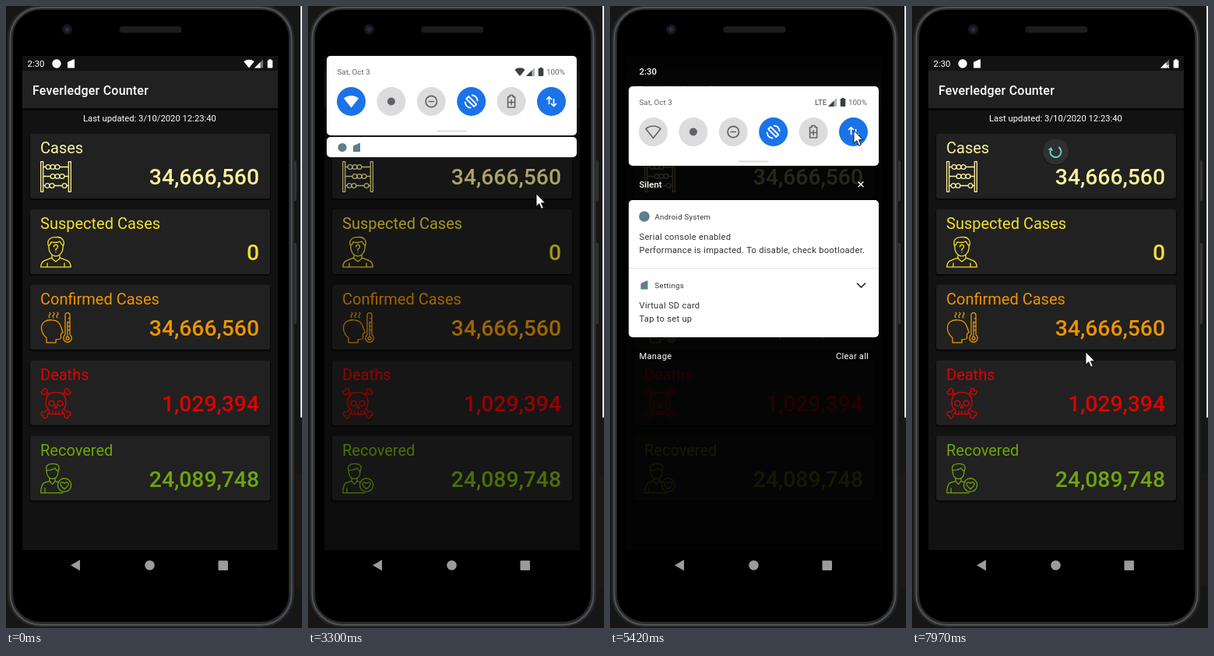
Recreate the animation shown at these times as an HTML page with a canvas. Size 380x798 px, loop 8000 ms.

```html
<!DOCTYPE html>
<html lang="en">
<head>
<meta charset="utf-8">
<title>Case counter</title>
<style>
html, body { margin: 0; width: 100%; height: 100%; overflow: hidden; background: #141414; }
canvas { display: block; width: 380px; height: 798px; }
</style>
</head>
<body>
<canvas id="stage"></canvas>
<script>
const W = 380, H = 798, LOOP = 8000;
const stage = document.getElementById('stage');
const dpr = window.devicePixelRatio || 1;
stage.width = W * dpr;
stage.height = H * dpr;
const c = stage.getContext('2d');

// Screen updates come in bursts: [start, end, steps]
const bursts = [
  [0, 0, 1], [350, 590, 3], [830, 1530, 7], [1650, 2370, 7], [2490, 2490, 1],
  [2950, 3660, 7], [3760, 4210, 5], [4440, 4440, 1], [4690, 5420, 7],
  [5750, 6180, 5], [6400, 7140, 7], [7250, 7250, 1], [7500, 7970, 5]
];

const pointer = [
  [350, 121, 118], [470, 165, 140], [590, 198, 160], [830, 200, 215], [950, 208, 363],
  [1070, 212, 362], [1190, 240, 310], [1310, 270, 240], [1530, 294, 172],
  [1650, 303, 140], [1890, 326, 75], [2130, 312, 61], [2370, 300, 64], [2490, 298, 69],
  [2950, 298, 73], [3070, 297, 100], [3300, 293, 241], [3540, 291, 405], [3660, 290, 455],
  [3760, 290, 462], [3880, 290, 462], [4210, 67, 180], [4440, 57, 157], [4690, 57, 158],
  [4810, 70, 167], [5050, 190, 172], [5290, 304, 164], [5420, 313, 160], [5750, 313, 160],
  [5850, 300, 230], [6070, 191, 490], [6180, 211, 513], [6640, 211, 513],
  [7140, 217, 249], [7250, 217, 249], [7500, 218, 290], [7740, 225, 400], [7970, 223, 444]
];
// 0 closed, 1 header only, 2 fully open
const shadeKeys = [
  [2950, 0], [3070, .25], [3190, .6], [3300, 1], [3420, 1.45], [3540, 1.85], [3660, 2],
  [6280, 2], [6400, 1.7], [6520, .8], [6640, .19], [6760, .08], [6880, .02], [7000, 0]
];
const spinY = [
  [830, 122], [950, 165], [1070, 187], [1650, 187], [7400, 118],
  [7500, 124], [7620, 146], [7740, 167], [7850, 180], [7970, 187]
];
const spinSize = [[820, 0], [830, 1], [1430, 1], [1530, .5], [1640, 0], [7490, 0], [7500, 1]];

const clamp = v => Math.max(0, Math.min(1, v));
const mix = (a, b, k) => a + (b - a) * k;

function key(list, t, i = 1) {
  if (t <= list[0][0]) return list[0][i];
  for (let n = 1; n < list.length; n++) {
    const a = list[n - 1], b = list[n];
    if (t <= b[0]) return mix(a[i], b[i], (t - a[0]) / (b[0] - a[0]));
  }
  return list[list.length - 1][i];
}

function hold(t) {
  let last = 0;
  for (const [a, b, n] of bursts) {
    for (let i = 0; i < n; i++) {
      const at = n > 1 ? Math.floor((a + (b - a) * i / (n - 1)) / 10) * 10 : a;
      if (at > t) return last;
      last = at;
    }
  }
  return last;
}

function box(x, y, w, h, r, fill) {
  c.beginPath();
  c.roundRect(x, y, w, h, r);
  c.fillStyle = fill;
  c.fill();
}

function disc(x, y, r, fill) {
  c.beginPath();
  c.arc(x, y, r, 0, 7);
  c.fillStyle = fill;
  c.fill();
}

function text(s, x, y, size, fill, { weight = 400, align = 'left', gap = 0 } = {}) {
  c.font = `${weight} ${size}px Roboto, sans-serif`;
  c.letterSpacing = gap + 'px';
  c.textAlign = align;
  c.fillStyle = fill;
  c.fillText(s, x, y);
}

function shape(d, x, y, { fill, stroke, width = 1.3 } = {}) {
  const p = new Path2D(d);
  c.save();
  c.translate(x, y);
  c.lineWidth = width;
  c.lineJoin = c.lineCap = 'round';
  if (fill) { c.fillStyle = fill; c.fill(p); }
  if (stroke) { c.strokeStyle = stroke; c.stroke(p); }
  c.restore();
}

function faded(a, draw) {
  if (a <= 0) return;
  c.save();
  c.globalAlpha *= clamp(a);
  draw();
  c.restore();
}

const ring = (x, y, r) => `M${x - r} ${y}a${r} ${r} 0 1 0 ${2 * r} 0a${r} ${r} 0 1 0 ${-2 * r} 0`;
const beads = (y, xs) => xs.map(x => ring(x, y, 2.9)).join('');

const icons = {
  abacus: 'M.7 .7h3v38.6h-3zM36.3 .7h3v38.6h-3zM3.7 7.5H7M25 7.5H36.3M3.7 19.5H13M31 19.5H36.3M3.7 31.5H6M18.5 31.5H28M34 31.5H36.3'
    + beads(7.5, [10, 16, 22]) + beads(19.5, [16, 22, 28]) + beads(31.5, [9, 15, 31]),
  suspect: 'M11 13C7 4 14 0 20 .8C27-.5 33 5 29 13M11 11C10 18 14 25 20 25S30 18 29 11C26 10 26 6 25 6C21 9 15 7 14 7C13 9 13 11 11 11M15 24V28L20 32L25 28V24M15 27L5 31Q1 33 .8 39H39.2Q39 33 35 31L25 27M9 39V34M31 39V34'
    + 'M17.5 13Q17.5 10.5 20 10.5T22.5 13Q22.5 14.5 20 16V17.5M20 20v.2',
  fever: 'M8 39V33Q2 28 1.5 21C1 12 9 9.5 15 10Q25 10.5 27 20L29 26L26.5 28V33Q26 35 20 35V39Z'
    + 'M12 7q-2-2 0-3.5t0-3M17 7q-2-2 0-3.5t0-3M22 7q-2-2 0-3.5t0-3'
    + 'M32 29V4Q32 .8 35 .8T38 4V29A5.2 5.2 0 1 1 32 29M35 12V31M38 8h-2M38 13h-2M38 18h-2M38 23h-2' + ring(35, 33.5, 2),
  skull: 'M12 29Q7 26 7 18Q8 6 20 6T33 18Q33 26 28 29V34H12ZM16 30v4M20 30v4M24 30v4M20 22l-2 4h4z'
    + ring(14.5, 20, 3.4) + ring(25.5, 20, 3.4)
    + 'M10 10L7 8Q2 10 1 6Q1 4 4 4Q4 0 7 1Q10 3 8 6L12 8M30 10L33 8Q38 10 39 6Q39 4 36 4Q36 0 33 1Q30 3 32 6L28 8'
    + 'M9 28L6 31Q1 30 1 34Q1 36 4 36Q4 40 7 39Q10 37 9 34L12 31M31 28L34 31Q39 30 39 34Q39 36 36 36Q36 40 33 39Q30 37 31 34L28 31',
  healed: 'M8 9C6 2 12 .5 16 .8C22 0 26 4 23 10C23 17 20 20 15.5 20S8 16 8 9C13 9 17 8 19 6Q20 9 23 10M12 19V23L15.5 27L19 23V19M12 23L5 25Q.8 28 .8 38H29M6 38V32M19 23L24 24.5'
    + ring(31, 28, 8.6) + 'M31 33Q25.5 29 26 26Q28 22.5 31 26Q34 22.5 36 26Q36.5 29 31 33'
};

const cards = [
  ['Cases', '34,666,560', '#fff59d', 'abacus'],
  ['Suspected Cases', '0', '#f5e02c', 'suspect'],
  ['Confirmed Cases', '34,666,560', '#ee9500', 'fever'],
  ['Deaths', '1,029,394', '#e00000', 'skull'],
  ['Recovered', '24,089,748', '#6fa50a', 'healed']
];

const sdCard = 'M3-5.5H4.5V5.5H-4.5V-2Z';
const fan = 'M0 5.5L-6.7 -2.7A10.4 10.4 0 0 1 6.7 -2.7Z';

function phone() {
  c.fillStyle = '#161616';
  c.fillRect(0, 0, W, H);
  c.fillStyle = '#1d1813';
  c.fillRect(372, 600, 8, 145);
  c.fillStyle = '#e6e6e6';
  c.fillRect(378, 0, 2, 528);
  box(367, 198, 6, 52, 2, '#303234');
  box(367, 304, 6, 104, 2, '#303234');
  box(2, -1, 368, 798, 42, '#27292b');
  c.beginPath();
  c.roundRect(5.5, 2, 361, 792, 39);
  c.lineWidth = 2;
  c.strokeStyle = '#505356';
  c.stroke();
  box(9, 5, 354, 785, 35, '#000');
  disc(78.5, 30, 6.5, '#15171b');
  disc(78.5, 30, 3, '#262c40');
  box(145.5, 26, 80, 8.5, 4, '#1c1c1c');
  shape('M-6 0L6-7V7Z', 89, 717.5, { fill: '#9b9b9b' });
  disc(184.5, 717.5, 6.3, '#9b9b9b');
  box(272.5, 711.5, 12.5, 12.5, 1, '#9b9b9b');
}

function signal(x, y, col, offline) {
  faded(.4, () => shape('M-5.5 5.5H5.5V-5.5Z', x, y, { fill: col }));
  shape('M-5.5 5.5H2V-2Z', x, y, { fill: col });
  if (offline) shape('M2 2l3 3M5 2l-3 3', x, y, { stroke: col, width: 1.2 });
}

function battery(x, y, col) {
  box(x - 3.3, y - 4.5, 6.6, 10, 1, col);
  box(x - 1.5, y - 5.7, 3, 2, 0, col);
}

function statusBar(t) {
  text('2:30', 27.5, 78, 11.4, '#fff');
  disc(65, 74, 5.7, '#fff');
  shape(sdCard, 83.5, 74, { fill: '#fff' });
  if (t < 4800) shape(fan, 312, 74, { fill: '#fff' });
  signal(324.5, 74, '#fff', t >= 5750);
  battery(339, 74, '#fff');
}

function app() {
  c.fillStyle = '#121212';
  c.fillRect(21, 64, 328, 634);
  c.fillStyle = '#060606';
  c.fillRect(21, 131, 328, 3);
  c.fillStyle = '#212121';
  c.fillRect(21, 83, 328, 48);
  text('Feverledger Counter', 34, 113.5, 16, '#fff', { weight: 500, gap: .21 });
  text('Last updated: 3/10/2020 12:23:40', 184.5, 148, 11.27, '#fff', { align: 'center' });
  cards.forEach(([name, count, col, icon], i) => {
    const y = 164 + i * 96.9;
    box(30, y + .5, 310, 84.5, 4, '#070707');
    box(31, y, 308, 83, 3, '#212121');
    text(name, 44, y + 25, 20, col);
    text(count, 325, y + 65, 28.3, col, { weight: 500, align: 'right' });
    shape(icons[icon], 44, y + 35, { stroke: col });
  });
}

function spinner(t) {
  const size = key(spinSize, t);
  if (size <= 0) return;
  c.save();
  c.beginPath();
  c.rect(21, 131, 328, 567);
  c.clip();
  c.translate(184.5, key(spinY, t));
  c.scale(size, size);
  disc(0, 1, 17, 'rgba(0,0,0,.3)');
  disc(0, 0, 16.5, '#303030');
  c.rotate(t < 3000 ? (t - 1070) / 160 : (t - 7970) / 250);
  const end = 3.4;
  c.beginPath();
  c.arc(0, 0, 7, -1, end);
  c.lineWidth = 1.9;
  c.strokeStyle = '#5fd9c1';
  c.stroke();
  c.rotate(end);
  shape('M3.5 0H10.5L7 4Z', 0, 0, { fill: '#5fd9c1' });
  c.restore();
}

const BLUE = '#1a73e8', GREY = '#5f6368';
const tileIcons = [
  (x, y, col, on) => shape('M0 8L-9.5-4A14.5 14.5 0 0 1 9.5-4Z', x, y, on ? { fill: col } : { stroke: col, width: 1.6 }),
  (x, y, col) => disc(x, y, 5, col),
  (x, y, col) => shape(ring(0, 0, 7.2) + 'M-3 0H3', x, y, { stroke: col, width: 1.7 }),
  (x, y, col) => shape('M-3.5-6.5L6.5 3.5L3.5 6.5L-6.5-3.5ZM1-8Q7-7.5 8-1M-1 8Q-7 7.5-8 1', x, y, { stroke: col, width: 1.8 }),
  (x, y, col) => shape('M-4.5-6H-2V-8H2V-6H4.5V7.5H-4.5ZM0-2V4M-3 1H3', x, y, { stroke: col, width: 1.6 }),
  (x, y, col) => shape('M-3 3V-6M-6-3L-3-6L0-3M3-3V6M0 3L3 6L6 3', x, y, { stroke: col, width: 1.7 })
];

function ripple(x, y, age) {
  if (age < 0 || age > 420) return;
  faded(.22 * (1 - age / 450), () => disc(x, y, mix(17, 24, clamp(age / 150)), '#555'));
}

// Laid out at its open position; the caller shifts it
function header(t, s) {
  box(24, 103, 321, 102, 5, '#fff');
  faded((s - .3) * 2, () => {
    text('Sat, Oct 3', 37.5, 127, 9.8, GREY, { gap: .05 });
    if (t < 4800) shape(fan, 272, 123.5, { fill: '#3c4043' });
    else if (t < 5850) text('LTE', 263, 127, 9.8, '#3c4043');
    signal(285.5, 123.5, '#3c4043', t >= 5850);
    battery(299, 123.5, '#3c4043');
    text('100%', 306, 127, 9.9, GREY);
    const states = [t < 4800, false, false, true, false, t < 5750];
    states.forEach((on, i) => {
      const x = 55.5 + i * 51.4, y = 161.5;
      disc(x, y, 18.5, on ? BLUE : '#dcdcdc');
      tileIcons[i](x, y, on ? '#fff' : GREY, on);
    });
    ripple(55.5, 161.5, t - 4690);
    ripple(312.5, 161.5, t - 5750);
    box(165, 198.5, 39, 2, 1, '#dadce0');
  });
}

function notices(s, shift) {
  const e = clamp(s - 1);
  const top = mix(207 + shift, 249, e), h = mix(26, 176, e);
  c.save();
  c.beginPath();
  c.roundRect(24, top, 321, h, 5);
  c.fillStyle = '#fff';
  c.fill();
  c.clip();
  faded(1 - e * 3, () => {
    disc(44, top + 13.5, 5.6, '#607d8b');
    shape(sdCard, 62.5, top + 13.5, { fill: '#607d8b' });
  });
  faded(e * 2 - .3, () => {
    const ink = '#303235', small = { gap: .3 }, body = { gap: .26 };
    c.translate(0, top - 249);
    disc(44, 270, 6.8, '#607d8b');
    text('Android System', 57.5, 274, 9.6, ink, small);
    text('Serial console enabled', 37.5, 300, 11.2, ink, body);
    text('Performance is impacted. To disable, check bootloader.', 37.5, 316.5, 11.2, ink, body);
    c.fillStyle = '#e8e8e8';
    c.fillRect(24, 336, 321, 1);
    shape(sdCard, 44, 358, { fill: '#607d8b' });
    text('Settings', 57.5, 362, 9.6, ink, small);
    shape('M-5-2.5L0 2.5L5-2.5', 322.5, 358.5, { stroke: '#202124', width: 1.7 });
    text('Virtual SD card', 37.5, 388, 11.2, ink, body);
    text('Tap to set up', 37.5, 405, 11.2, ink, body);
  });
  c.restore();
}

function shade(t, s) {
  const dim = .33 * clamp((s - .2) / .8) + .51 * clamp(s - 1);
  c.fillStyle = `rgba(0,0,0,${dim})`;
  c.fillRect(21, 64, 328, 634);
  const shift = s < 1 ? -141 + 102 * s : -39 * (2 - s);
  c.save();
  c.beginPath();
  c.rect(21, 64, 328, 634);
  c.clip();
  faded((s - .4) * 3, () => notices(s, shift));
  faded(s * 2.1, () => {
    c.translate(0, shift);
    header(t, s);
  });
  faded((s - 1.5) * 2, () => {
    text('2:30', 37.5, 88, 11.4, '#fff', { weight: 500 });
    text('Silent', 37.5, 233, 11.2, '#fff', { weight: 500, gap: .1 });
    shape('M-3-3L3 3M3-3L-3 3', 322, 228.7, { stroke: '#fff', width: 1.4 });
  });
  const foot = t < 3660 ? 0 : t > 6300 ? s - 1.2 : key([[3660, .2], [3760, .45], [3880, .66], [4210, 1]], t);
  faded(foot, () => {
    text('Manage', 37.5, 453, 11.2, '#fff', { gap: .26 });
    text('Clear all', 332, 453, 11.2, '#fff', { gap: .2, align: 'right' });
  });
  c.restore();
}

function paint(t) {
  const s = key(shadeKeys, t);
  c.setTransform(dpr, 0, 0, dpr, 0, 0);
  phone();
  app();
  spinner(t);
  if (s > 0) shade(t, s);
  faded(1 - (s - .2) * 2, () => statusBar(t));
  if (t >= 350) {
    shape('M0 0V16.2L3.8 12.7L6.6 19.2L9.3 18L6.5 11.7H11.5Z', key(pointer, t, 1), key(pointer, t, 2),
      { fill: '#fff', stroke: '#000', width: .9 });
  }
}

const start = performance.now();
function tick() {
  paint(hold((performance.now() - start) % LOOP));
  requestAnimationFrame(tick);
}
tick();
</script>
</body>
</html>
```
